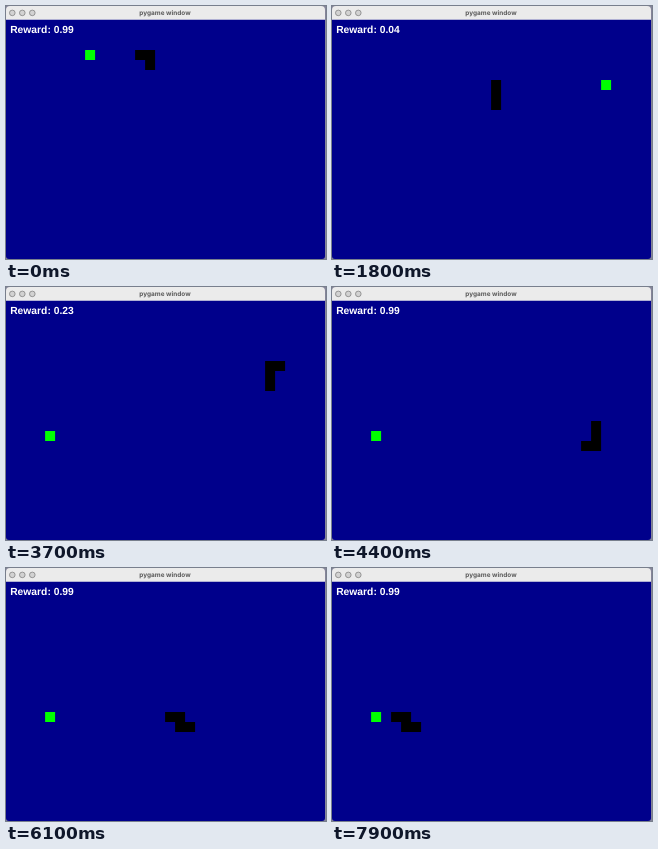
Write an HTML page that moves like this. It is 320 px wide and 253 px high and loops after 8000 ms.

```html
<!DOCTYPE html>
<html lang="en">
<head>
<meta charset="utf-8">
<title>pygame window</title>
<style>
  html, body { margin: 0; width: 100%; height: 100%; overflow: hidden; }
  svg { display: block; width: 100vw; height: 100vh; }
  text { text-rendering: geometricPrecision; }
  .title { font: 700 6.45px Inter, "Liberation Sans", sans-serif; fill: #5a5a5a; text-anchor: middle; }
  .reward { font: 700 10.3px "Liberation Sans", Arial, sans-serif; fill: #fff; }
</style>
</head>
<body>
<svg viewBox="0 0 320 253">
  <rect width="320" height="253" fill="#85859a"/>
  <path d="M0 14V4Q0 0 4 0H315Q319 0 319 4V14Z" fill="#ebebeb"/>
  <g fill="#d2d2d2" stroke="#858585" stroke-width=".8">
    <circle cx="6.3" cy="6.9" r="2.8"/>
    <circle cx="16.3" cy="6.9" r="2.8"/>
    <circle cx="26.3" cy="6.9" r="2.8"/>
  </g>
  <text class="title" x="159" y="9.2">pygame window</text>
  <path d="M0 13.8H319V250Q319 253 316 253H3Q0 253 0 250Z" fill="#00008b"/>
  <path id="snake" fill="#000"/>
  <path id="food" fill="#0f0"/>
  <text id="reward" class="reward" x="4.2" y="27"></text>
</svg>
<script>
const LOOP = 8000, FRAME = 100;
const STEPS_PER_FRAME = 1.063, PHASE = 0.035;
const DIRS = { U: [0, -1], D: [0, 1], L: [-1, 0], R: [1, 0] };
const byId = id => document.getElementById(id);

// Cells visited from a starting cell following a string of moves.
function walk(start, moves) {
  const cells = [start];
  for (const move of moves) {
    const [x, y] = cells[cells.length - 1];
    cells.push([x + DIRS[move][0], y + DIRS[move][1]]);
  }
  return cells;
}

// Each life begins with a three-cell body; foods are eaten in order.
const lives = [
  {
    from: 0,
    cells: walk([14, 4], "UL" + "DLUL".repeat(2) + "DLUD"),
    foods: [[8, 3], [27, 6]],
    eatenAt: 11
  },
  {
    from: 13,
    cells: walk([14, 12], "RR" + "U".repeat(7) + "R".repeat(13) + "DLLL" +
      "D".repeat(8) + "L" + "ULDL".repeat(10)),
    foods: [[27, 6], [4, 13]],
    eatenAt: 36
  }
];

const distance = (a, b) => Math.hypot(a[0] - b[0], a[1] - b[1]);
const square = ([x, y]) => `M${10 * x - 0.9} ${10 * y + 14}h10v10h-10z`;

function draw(time) {
  const frame = Math.floor((time % LOOP) / FRAME);
  const step = Math.floor(frame * STEPS_PER_FRAME + PHASE);
  const life = lives[step < lives[1].from ? 0 : 1];
  const head = step - life.from + 2;
  const fed = step >= life.eatenAt;
  const goal = life.foods[step > life.eatenAt ? 1 : 0];
  const gain = distance(life.cells[head - 1], goal) - distance(life.cells[head], goal) - 0.01;

  byId("snake").setAttribute("d",
    life.cells.slice(Math.max(0, head - (fed ? 3 : 2)), head + 1).map(square).join(""));
  byId("food").setAttribute("d", square(life.foods[fed ? 1 : 0]));
  byId("reward").textContent = "Reward: " + gain.toFixed(2);
}

const began = performance.now();
function tick() {
  draw(performance.now() - began);
  requestAnimationFrame(tick);
}
tick();
</script>
</body>
</html>
```
